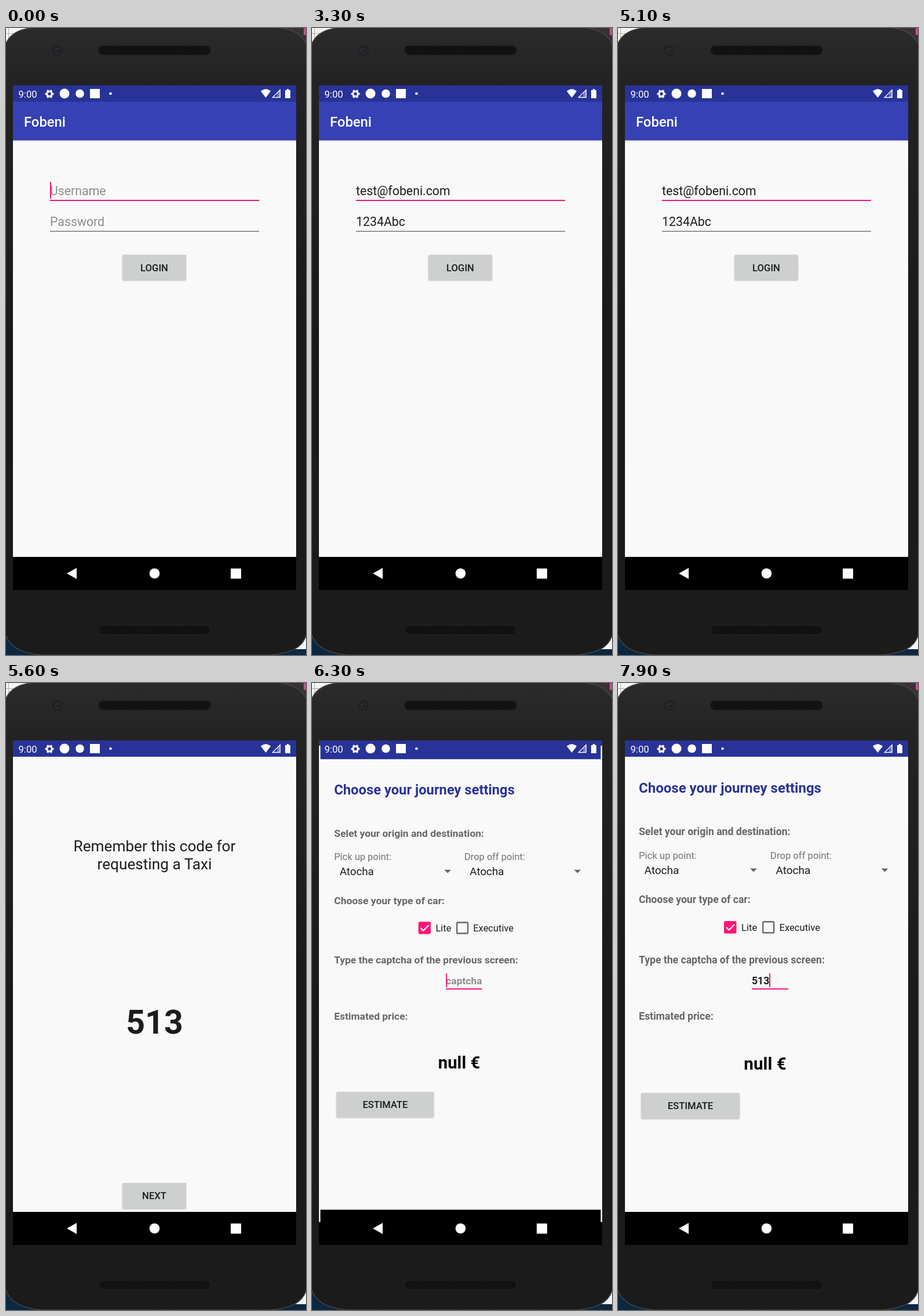
Animation, 518 px wide and 1080 px high, one loop 8000 ms. Source, as an HTML page:

```html
<!DOCTYPE html>
<html lang="en">
<head>
<meta charset="utf-8">
<title>Taxi app login</title>
<style>
  html, body { margin: 0; width: 100%; height: 100%; overflow: hidden; background: #1a1a1a; }
  svg { display: block; width: 518px; height: 1080px; font-family: Roboto, sans-serif; }
  text { fill: #1b1c1c; white-space: pre; }
  .mid { text-anchor: middle; }
  .field { font-size: 21.3px; }
  .small { font-size: 16.65px; }
  .button { font-size: 16.65px; font-weight: 500; text-anchor: middle; }
  .item { font-size: 19px; }
  .strong { font-size: 17.6px; font-weight: 700; }
  .label { fill: #666; }
  .grey { fill: #737373; }
  .hint { fill: #8d8d8d; }
  .white { fill: #fff; }
  .pink { fill: #f0147a; }
</style>
</head>
<body>
<svg viewBox="0 0 518 1080">
  <defs>
    <linearGradient id="shell" x2="0" y2="1">
      <stop stop-color="#2b2b2b"/>
      <stop offset=".09" stop-color="#232323"/>
      <stop offset=".5" stop-color="#191a1a"/>
      <stop offset="1" stop-color="#1b1b1b"/>
    </linearGradient>
    <linearGradient id="drop" x2="0" y2="1">
      <stop stop-color="#d4d4d6"/>
      <stop offset="1" stop-color="#f9f9f9"/>
    </linearGradient>
    <pattern id="mesh" width="5" height="5" patternUnits="userSpaceOnUse">
      <path d="M1 1h1.6v1.6h-1.6zM3.5 3.5h1.6v1.6h-1.6z" fill="#030303"/>
    </pattern>
    <filter id="lift" x="-10%" y="-20%" width="120%" height="150%">
      <feDropShadow dx="0" dy="1.2" stdDeviation="1.2" flood-opacity=".26"/>
    </filter>
    <clipPath id="display"><path d="M12 99H501V968H12z"/></clipPath>
    <g id="window">
      <path d="M12 126H501V912H12z" fill="#f9f9f9"/>
      <path d="M12 99H501V127H12z" fill="#283397"/>
      <path d="M12 911H501V968H12z"/>
    </g>
    <g id="speaker">
      <rect x="159" width="195" height="17" rx="8.5" fill="#151515" stroke="#2a2a2a" stroke-width=".7"/>
      <rect x="162" y="2" width="189" height="13" rx="6.5" fill="url(#mesh)"/>
    </g>
    <path id="arrow" d="M-6 0H6L0 6z" fill="#666"/>
  </defs>

  <!-- desktop behind the phone -->
  <path d="M0 0H518V1080H0z" fill="#f5f5f5"/>
  <path d="M4.500 0V40M0 9.500H40" stroke="#aaa"/>
  <path d="M470 0H518V30z" fill="#3b3038"/>
  <path d="M514 0H518V12H514z" fill="#c34f8c"/>
  <path d="M0 1000H70V1080H0zM400 1070H518V1080H400z" fill="#0c2740"/>

  <!-- phone -->
  <path d="M-1 28C7 10 22 2 48 -1H470C494 2 510 10 519 28V1044C513 1065 498 1076 456 1080H62C26 1077 6 1066 -1 1044z"
        fill="url(#shell)" stroke="#454545" stroke-width="1.500"/>
  <circle cx="89" cy="39" r="9.500" fill="#222123"/>
  <circle cx="89" cy="39" r="5.500" fill="#2b2830"/>
  <circle cx="90" cy="40" r="2.500" fill="#1e1c21"/>
  <use href="#speaker" y="30"/>
  <use href="#speaker" y="1028.500"/>

  <g clip-path="url(#display)">
    <g id="login">
      <use href="#window"/>
      <path d="M12 193H501V197H12z" fill="url(#drop)"/>
      <path d="M12 127H501V193.500H12z" fill="#3541b4"/>
      <text class="white" x="31" y="169.500" font-size="23.800" font-weight="500">Fobeni</text>
      <text id="user" class="field" x="76" y="287.700"></text>
      <path class="pink" d="M76 296H437V298H76z"/>
      <rect id="userCaret" class="pink" y="265" width="2" height="29"/>
      <text id="password" class="field" x="76" y="341"></text>
      <path d="M76 350.300H437" stroke="#777" stroke-width="1.400"/>
      <rect x="201" y="390.600" width="110" height="43.400" rx="2" fill="#ced0cf" filter="url(#lift)"/>
      <text class="button" x="256" y="419">LOGIN</text>
    </g>

    <g id="code">
      <use href="#window"/>
      <g class="mid" font-size="26.200">
        <text x="256.500" y="290">Remember this code for</text>
        <text x="256.500" y="321">requesting a Taxi</text>
      </g>
      <text class="mid" x="256.500" y="604" font-size="57.200" font-weight="700">513</text>
      <rect x="201" y="861" width="110" height="44" rx="2" fill="#ced0cf" filter="url(#lift)"/>
      <rect id="press" x="201" y="861" width="110" height="44" rx="2"/>
      <text class="button" x="256" y="889">NEXT</text>
    </g>

    <g id="journey">
      <use href="#window"/>
      <text x="36" y="188.500" font-size="24" font-weight="700" style="fill:#283397">Choose your journey settings</text>
      <text class="strong label" x="36" y="262">Selet your origin and destination:</text>
      <text class="strong label" x="36" y="379">Choose your type of car:</text>
      <text class="strong label" x="36" y="483">Type the captcha of the previous screen:</text>
      <text class="strong label" x="36" y="580">Estimated price:</text>
      <text class="small grey" x="36" y="303">Pick up point:</text>
      <text class="small grey" x="263" y="303">Drop off point:</text>
      <text class="item" x="45.500" y="329">Atocha</text>
      <text class="item" x="272.500" y="329">Atocha</text>
      <use href="#arrow" x="234" y="319.500"/>
      <use href="#arrow" x="460.500" y="319.500"/>
      <rect x="183" y="410" width="21.500" height="21.500" rx="2.500" fill="#ff1673"/>
      <path d="M187 421L191.500 425.500L201 416" fill="none" stroke="#fff" stroke-width="2.200"/>
      <rect x="250.200" y="411.200" width="19" height="19" rx="1.500" fill="none" stroke="#686868" stroke-width="2.400"/>
      <text class="small" x="213" y="427">Lite</text>
      <text class="small" x="278.500" y="427">Executive</text>
      <text id="captcha" class="strong" x="231" y="518.500"></text>
      <path class="pink" d="M231 526H294V528H231z"/>
      <rect id="captchaCaret" class="pink" y="500" width="2" height="24"/>
      <text class="mid" x="254" y="665.500" font-size="29.700" font-weight="700" style="fill:#050505">null €</text>
      <rect x="40" y="706" width="170" height="44" rx="2" fill="#ced0cf" filter="url(#lift)"/>
      <text class="button" x="125" y="734">ESTIMATE</text>
    </g>
  </g>

  <!-- system bars -->
  <g fill="#fff">
    <text class="small white" x="21.500" y="119.500">9:00</text>
    <g fill="none" stroke="#fff">
      <circle cx="75" cy="113.500" r="4.300" stroke-width="3.200"/>
      <circle cx="75" cy="113.500" r="6.500" stroke-width="2" pathLength="12" stroke-dasharray="1" stroke-dashoffset=".5"/>
    </g>
    <circle cx="101" cy="113" r="8.500"/>
    <circle cx="127.500" cy="113" r="7.300"/>
    <rect x="145" y="105" width="17" height="16"/>
    <circle cx="180.500" cy="113" r="2.300"/>
    <path d="M440 109Q448.500 101.500 457 109L448.500 120z"/>
    <path d="M473.300 106.500V119.500H460.300z" fill="none" stroke="#fff" stroke-width="1.300"/>
    <path d="M468 112L473 107V119H468z" opacity=".35"/>
    <path d="M482 107H484.800V105H488.200V107H491V121H482z"/>
    <path d="M105 939.500L122 930V949z"/>
    <circle cx="256.500" cy="939.500" r="8.800"/>
    <rect x="388" y="931" width="18" height="17.500" rx="1"/>
  </g>
</svg>
<script>
  const LOOP = 8000, STEP = 100, OPEN_MS = 400;
  const CODE_OPENS = 5222, JOURNEY_OPENS = 6122;
  const $ = id => document.getElementById(id);

  const bezier = (a, b, c, d, u) => {
    const v = 1 - u;
    return a * v ** 3 + 3 * b * u * v * v + 3 * c * u * u * v + d * u ** 3;
  };

  // Two joined curves: quick start, then a very long settle.
  function ease(t) {
    if (t <= 0) return 0;
    if (t >= 1) return 1;
    const [xs, ys] = t < 1 / 6
      ? [[0, .05, .1333, 1 / 6], [0, 0, .06, .4]]
      : [[1 / 6, .2083, .25, 1], [.4, .82, 1, 1]];
    let low = 0, high = 1;
    for (let i = 0; i < 24; i++) {
      const u = (low + high) / 2;
      if (bezier(...xs, u) < t) low = u; else high = u;
    }
    return bezier(...ys, low);
  }

  function scale(id, s) {
    $(id).setAttribute('transform', `translate(256.5 533.5) scale(${s}) translate(-256.5 -533.5)`);
  }

  // The new screen grows in over the old one, which swells slightly behind it.
  function open(from, to, elapsed) {
    const p = ease(elapsed / OPEN_MS);
    scale(from, 1 + .05 * p);
    scale(to, .85 + .15 * p);
    $(to).setAttribute('opacity', Math.min(1, Math.max(0, (elapsed - 35) / 50)));
  }

  function fill(id, typed, value, hint) {
    $(id).textContent = typed ? value : hint;
    $(id).classList.toggle('hint', !typed);
  }

  function draw(t) {
    const hasUser = t >= 1600, hasCaptcha = t >= 7900;
    fill('user', hasUser, 'test@fobeni.com', 'Username');
    fill('password', t >= 2800, '1234Abc', 'Password');
    fill('captcha', hasCaptcha, '513', 'captcha');

    $('userCaret').setAttribute('x', hasUser ? 240 : 76);
    $('userCaret').setAttribute('opacity', hasUser ? 1 - Math.floor((t - 1600) / 500) % 2 : 1);
    $('captchaCaret').setAttribute('x', hasCaptcha ? 261 : 231);
    $('press').setAttribute('opacity', t < 5900 ? 0 : t < 6000 ? .08 : .15);

    open('login', 'code', t - CODE_OPENS);
    if (t >= JOURNEY_OPENS) open('code', 'journey', t - JOURNEY_OPENS);
    else $('journey').setAttribute('opacity', 0);
  }

  let start;
  function tick(now) {
    start ??= now;
    draw(Math.floor((now - start) % LOOP / STEP) * STEP);
    requestAnimationFrame(tick);
  }
  draw(0);
  requestAnimationFrame(tick);
</script>
</body>
</html>
```
